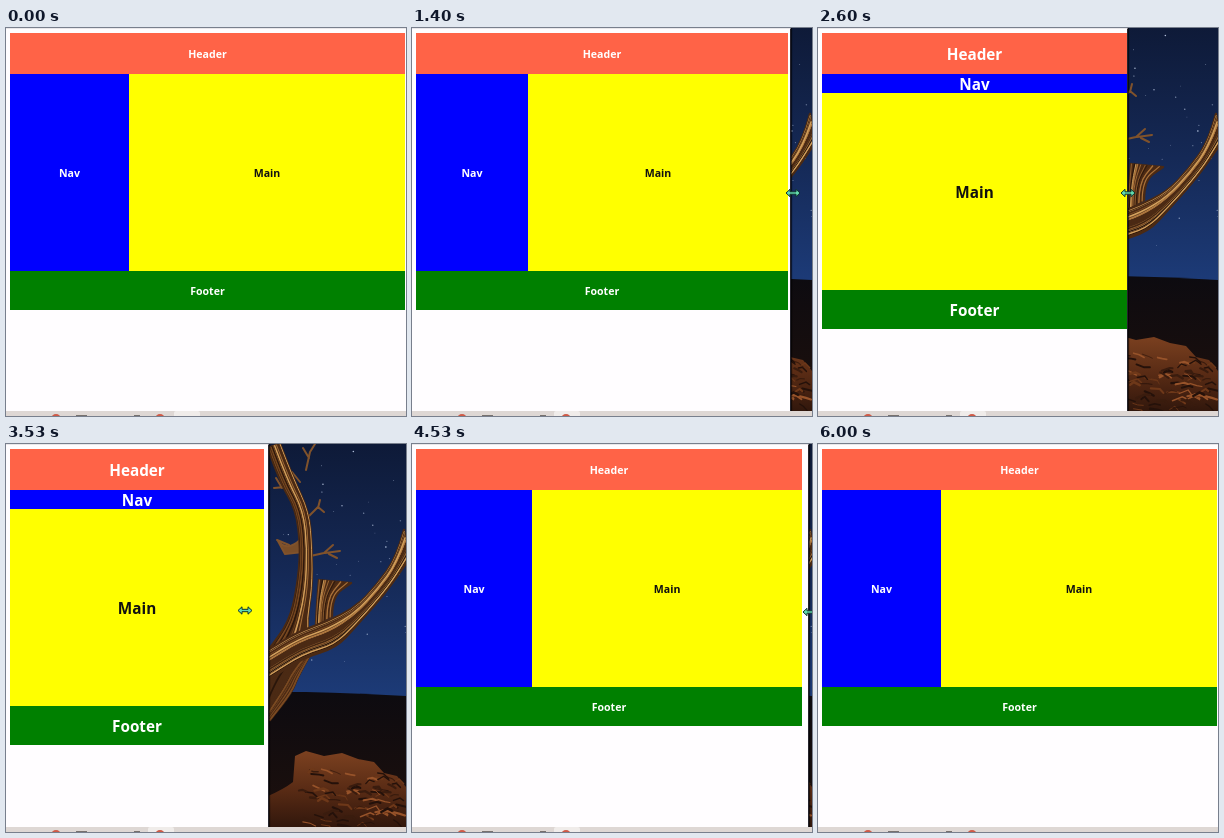
Animation of 400 by 388 pixels, one loop 6070 ms. Source, as an HTML page:

```html
<!DOCTYPE html>
<html lang="en">
<head>
<meta charset="utf-8">
<title>Responsive layout resize</title>
<style>
  html, body { margin: 0; width: 100%; height: 100%; overflow: hidden; }
  #stage { position: relative; width: 400px; height: 388px; overflow: hidden; background: #fffdff; }
  #photo, #cursor, #taskbar { position: absolute; left: 0; top: 0; }
  #window {
    position: absolute; left: 0; top: 0; height: 383px; overflow: hidden;
    box-sizing: border-box; background: #fffdff;
    border-top: 1px solid #e9e7ea; border-right: 1px solid #25232c;
    box-shadow: 1px 0 1px rgba(0, 0, 0, .6);
  }
  #page {
    position: absolute; left: 4px; top: 4px; display: grid;
    grid-template: 41px 197px 39px / 30.1% 69.9%;
    grid-template-areas: "header header" "nav main" "footer footer";
    font: 700 10.6px "Open Sans", "Noto Sans", sans-serif; color: #fff;
  }
  #page.narrow {
    grid-template: 41px 19px 197px 39px / 100%;
    grid-template-areas: "header" "nav" "main" "footer";
    font-size: 15.3px;
  }
  #page > * {
    display: flex; align-items: center; justify-content: center;
    box-sizing: border-box; min-width: 0; padding-top: .16em; line-height: 1;
  }
  header { grid-area: header; background: #ff6347; }
  nav { grid-area: nav; background: #00f; }
  main { grid-area: main; background: #ff0; color: #111; }
  footer { grid-area: footer; background: #008000; }
</style>
</head>
<body>
<div id="stage">
  <svg id="photo" width="400" height="388">
    <defs>
      <linearGradient id="sky" x2="0" y2="1">
        <stop offset="0" stop-color="#0e1a38"/>
        <stop offset=".5" stop-color="#152956"/>
        <stop offset="1" stop-color="#1d3c7a"/>
      </linearGradient>
      <linearGradient id="ground" x2="0" y2="1">
        <stop offset="0" stop-color="#0d0b10"/>
        <stop offset="1" stop-color="#1e100c"/>
      </linearGradient>
      <linearGradient id="rock" x2="0" y2="1">
        <stop offset="0" stop-color="#7c4120"/>
        <stop offset=".5" stop-color="#572a14"/>
        <stop offset="1" stop-color="#2c140b"/>
      </linearGradient>
    </defs>
    <rect width="400" height="262" fill="url(#sky)"/>
    <g id="stars" fill="#c5d3ec"></g>
    <path d="M0 248H300Q350 249 400 252V388H0Z" fill="url(#ground)"/>
    <path d="M262 352Q278 345 287 338L289 312 300 307 318 312 336 309 352 315 368 318 378 329 391 332 400 343V388H262Z" fill="url(#rock)"/>
    <g id="cracks" fill="none" stroke-linecap="round"></g>
    <g fill="none" stroke="#80522b" stroke-linecap="round" stroke-linejoin="round" stroke-width="2">
      <path d="M303 72L312 63 318 68M289 51L279 43 268 44M300 113L318 109 327 101M319 109L334 107M323 110L331 114M283 101L271 96M312 64L314 56M276 44L270 34"/>
      <path d="M272 97Q281 108 294 96L297 108 279 110Z" fill="#7a4e28"/>
      <path d="M300 26L304 8 309 0M294 38L286 28M303 14L297 4"/>
    </g>
    <g id="tree" fill="none" stroke-linecap="round"></g>
  </svg>
  <div id="window">
    <div id="page">
      <header>Header</header>
      <nav>Nav</nav>
      <main>Main</main>
      <footer>Footer</footer>
    </div>
  </div>
  <svg id="cursor" width="400" height="388">
    <path id="arrow" d="M-7 0L-3 -3.7V-1.2H3V-3.7L7 0 3 3.7V1.2H-3V3.7Z" fill="#62dcae" stroke="#10332c"/>
  </svg>
  <svg id="taskbar" width="400" height="388">
    <rect y="383" width="400" height="5" fill="#ded7d4"/>
    <rect id="highlight" y="383" width="26" height="8" rx="2" fill="#f0ecea"/>
    <circle cx="50" cy="391" r="5" fill="#cf5a47"/>
    <circle cx="154" cy="391" r="5" fill="#cf5a47"/>
    <path d="M70 387.5H81M128 387.5H134" stroke="#77716e"/>
  </svg>
</div>
<script>
  const $ = id => document.getElementById(id);
  const LOOP = 6070, STEP = 200 / 3, BREAKPOINT = 328;

  // Each track lists [step, value]; values between are linear.
  const pageRight = [[3, 399], [13, 387.5], [21, 376], [24, 370], [31, 342], [39, 309],
    [49, 258], [56, 258], [63, 331], [64, 340], [68, 390], [73, 398], [77, 399]];
  const windowRight = [[3, 402], [13, 391], [21, 379], [24, 371], [31, 343], [39, 309.5],
    [49, 262.5], [56, 262.5], [63, 335], [64, 345], [68, 397], [70, 402]];
  const cursorX = [[3, 409], [13, 394], [21, 381], [31, 344], [39, 310], [53, 239],
    [56, 258], [63, 335], [64, 346], [68, 398], [71, 412]];
  const cursorY = [[39, 165], [53, 166.5], [68, 168]];

  // Each limb is a bundle of wood strands between two edges.
  const bark = ["#2a160b", "#4b2a14", "#7a4a22", "#a8713a", "#d3a05c"];
  const limbs = [
    { strands: 16, from: [[300, 200], [276, 212], [262, 228], [258, 250]],
      to: [[304, 211], [292, 232], [286, 248], [264, 276]], tones: bark.slice(0, 3) },
    { strands: 16, from: [[310, 180], [311, 160], [313, 136]],
      to: [[326, 172], [326, 152], [345, 139]], tones: bark },
    { strands: 20, from: [[262, 4], [274, 38], [290, 65], [295, 105], [291, 145], [283, 178], [264, 204]],
      to: [[274, 0], [287, 34], [303, 68], [306, 105], [306, 145], [301, 175], [303, 198]], tones: bark },
    { strands: 26, from: [[398, 86], [391, 113], [371, 141], [349, 164], [320, 178], [292, 188], [262, 206]],
      to: [[402, 116], [390, 134], [374, 155], [350, 182], [330, 204], [298, 213], [262, 236]], tones: bark }
  ];

  function sample(track, step) {
    const next = track.findIndex(([s]) => s >= step);
    if (next === 0) return track[0][1];
    if (next < 0) return track[track.length - 1][1];
    const [s0, v0] = track[next - 1], [s1, v1] = track[next];
    return v0 + (v1 - v0) * (step - s0) / (s1 - s0);
  }

  let seed = 11;
  const random = (min, max) => {
    seed = (seed * 16807) % 2147483647;
    return min + (max - min) * seed / 2147483647;
  };
  const pick = list => list[Math.floor(random(0, list.length))];

  function add(parent, tag, attrs) {
    const node = document.createElementNS("http://www.w3.org/2000/svg", tag);
    for (const name in attrs) node.setAttribute(name, attrs[name]);
    parent.append(node);
  }

  // Smooth path through the midpoints of a polyline.
  function curve(points) {
    let d = `M${points[0]}`;
    for (let i = 1; i < points.length - 1; i++) {
      const [x, y] = points[i], [nx, ny] = points[i + 1];
      d += `Q${x} ${y} ${(x + nx) / 2} ${(y + ny) / 2}`;
    }
    return d + `L${points[points.length - 1]}`;
  }

  function paintLimb({ strands, from, to, tones }) {
    const strand = t => curve(from.map(([x, y], i) =>
      [x + (to[i][0] - x) * t, y + (to[i][1] - y) * t]));
    for (let i = 0; i <= strands; i++) {
      add($("tree"), "path", { d: strand(i / strands), stroke: tones[1], "stroke-width": 2.4 });
    }
    for (let i = 0; i < strands; i++) {
      add($("tree"), "path", {
        d: strand(random(0, 1)), stroke: pick(tones), "stroke-width": random(.6, 1.8)
      });
    }
  }

  function paintPhoto() {
    for (let i = 0; i < 42; i++) {
      add($("stars"), "circle", {
        cx: random(263, 400), cy: random(2, 235), r: random(.3, .8), opacity: random(.4, 1)
      });
    }
    for (let i = 0; i < 80; i++) {
      const x = random(290, 392), y = random(318 + Math.max(0, x - 360) * .6, 382);
      add($("cracks"), "path", {
        d: `M${x} ${y}l${random(3, 10)} ${random(-4, 3)}l${random(2, 6)} ${random(0, 5)}`,
        stroke: pick(["#97532a", "#24110a", "#3a1c0e", "#6e3819"]), "stroke-width": random(.7, 2.6)
      });
    }
    limbs.forEach(paintLimb);
  }

  function render(now) {
    const step = Math.floor((now % LOOP + 4) / STEP);
    const right = sample(pageRight, step);
    $("page").style.width = right - 4 + "px";
    $("page").classList.toggle("narrow", right < BREAKPOINT);
    $("window").style.width = sample(windowRight, step) + "px";
    $("arrow").setAttribute("transform", `translate(${sample(cursorX, step)} ${sample(cursorY, step)})`);
    $("highlight").setAttribute("x", step < 1 ? 168 : 142);
    $("highlight").style.display = step < 1 || (step >= 4 && step < 90) ? "" : "none";
  }

  paintPhoto();
  const start = performance.now();
  function tick() {
    render(performance.now() - start);
    requestAnimationFrame(tick);
  }
  tick();
</script>
</body>
</html>
```
